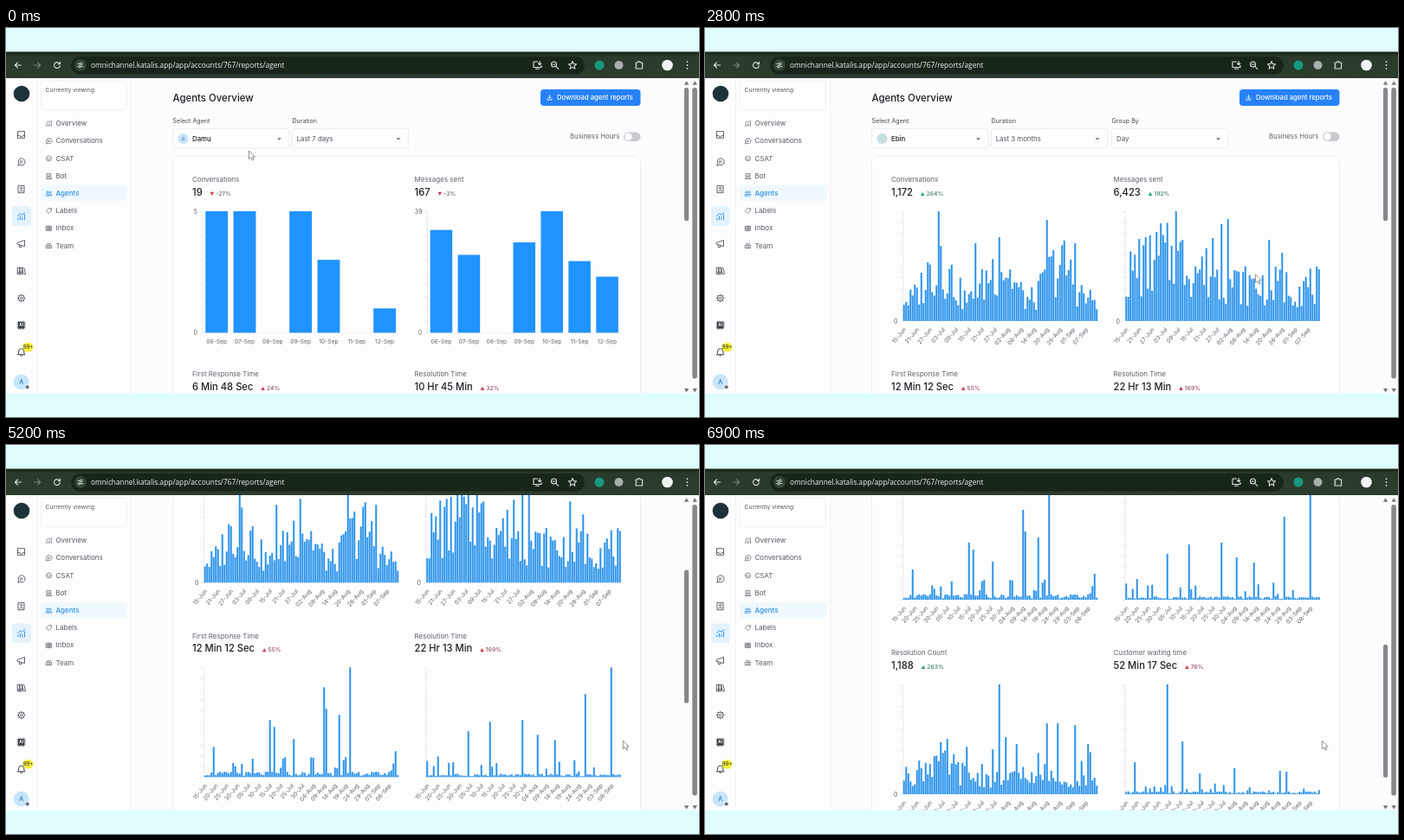
Animation, 800 px wide and 450 px high, one loop 7000 ms. Source, as an HTML page with a canvas:

```html
<!DOCTYPE html>
<html lang="en">
<head>
<meta charset="utf-8">
<title>Agents Overview</title>
<style>
html, body { margin: 0; width: 100%; height: 100%; overflow: hidden; background: #e0fdfd; }
canvas { display: block; width: 800px; height: 450px; }
</style>
</head>
<body>
<canvas id="stage" width="800" height="450"></canvas>
<script>
const ctx = document.getElementById('stage').getContext('2d');
const LOOP = 7000, STEP = 100;
const BLUE = '#1f93ff', THIN_BLUE = '#2b93ea', ACCENT = '#2b8fe0';
const INK = '#1c2024', GREY = '#60646c', LINE = '#ededf1';
const INTER = 'Inter, sans-serif';

// ---- drawing helpers ----
function text(s, x, y, size = 8, color = INK, weight = 400, align = 'left', family = INTER) {
  ctx.font = `${weight} ${size}px ${family}`;
  ctx.textAlign = align;
  ctx.fillStyle = color;
  ctx.fillText(s, x, y + size * 0.36);
  return ctx.measureText(s).width;
}
function rect(x, y, w, h, color) {
  ctx.fillStyle = color;
  ctx.fillRect(x, y, w, h);
}
function box(x, y, w, h, r, fill, stroke) {
  ctx.beginPath();
  ctx.roundRect(x, y, w, h, r);
  if (fill) { ctx.fillStyle = fill; ctx.fill(); }
  if (stroke) { ctx.strokeStyle = stroke; ctx.lineWidth = 1; ctx.stroke(); }
}
function disc(x, y, r, color) {
  ctx.beginPath();
  ctx.arc(x, y, r, 0, 7);
  ctx.fillStyle = color;
  ctx.fill();
}
function triangle(x, y, w, h, up, color) {
  const d = (up ? -h : h) / 2;
  ctx.beginPath();
  ctx.moveTo(x - w / 2, y - d);
  ctx.lineTo(x + w / 2, y - d);
  ctx.lineTo(x, y + d);
  ctx.fillStyle = color;
  ctx.fill();
}
function icon(name, x, y, color, scale = 1, width = 0.9) {
  ctx.save();
  ctx.translate(x, y);
  ctx.scale(scale, scale);
  ctx.strokeStyle = color;
  ctx.lineWidth = width / scale;
  ctx.lineCap = ctx.lineJoin = 'round';
  ctx.stroke(new Path2D(ICON[name]));
  ctx.restore();
}
function track(keys, t) {
  const n = keys.findIndex(k => t <= k[0]);
  if (n < 1) return keys.at(n).slice(1);
  const a = keys[n - 1], b = keys[n], k = (t - a[0]) / (b[0] - a[0]);
  return a.slice(1).map((v, j) => v + (b[j + 1] - v) * k);
}

// ---- icon paths ----
const ring = (x, y, r) => `M${x - r} ${y}a${r} ${r} 0 1 0 ${2 * r} 0a${r} ${r} 0 1 0 ${-2 * r} 0`;
function spokes(count, from, to) {
  let path = '';
  for (let i = 0; i < count; i++) {
    const a = i * 2 * Math.PI / count, c = Math.cos(a), s = Math.sin(a);
    path += `M${c * from} ${s * from}L${c * to} ${s * to}`;
  }
  return path;
}
const ICON = {
  inbox: 'M-4 -4h8v8h-8zM-4 1h2l1 1.5h2l1 -1.5h2',
  chat: 'M-4 4.2l.7 -2.4a4.2 4.2 0 1 1 1.7 1.7zM-1.6 -1h3.2M-1.6 1h2.2',
  book: 'M-3.5 -4.4h7v8.8h-7zM-2 2.4q2 -2 4 0' + ring(0, -1.3, 1.3),
  trend: 'M-4 4v-2M-1.3 4v-4M1.3 4v-3M4 4v-6M-4.3 -.5l3 -3l2.3 1.6l3.3 -2.6',
  horn: 'M-4.5 -1.2l8.5 -3v7.5l-8.5 -2.6zM-2.5 1.8v2.4h2.6v-1.6',
  shelf: 'M-4.3 -4h2.6v8h-2.6zM-1.7 -4h2.6v8h-2.6zM1.2 -3.2l2 -.5l2 7.2l-2 .5zM-4 1.8h4.6',
  gear: ring(0, 0, 3.7) + ring(0, 0, 1.4) + spokes(8, 3.7, 4.5),
  bell: 'M-4.3 2.8h8.6l-1.2 -1.8v-2a3.1 3.1 0 0 0 -6.2 0v2zM-1.2 3.2a1.2 1.2 0 0 0 2.4 0',
  smile: ring(0, 0, 4) + 'M-1.8 1.2q1.8 1.8 3.6 0M-1.5 -1v.2M1.5 -1v.2',
  bot: 'M-3 -3.5h6v4h-6zM-4 4v-1.5h8v1.5zM-1 -1.5v.2M1 -1.5v.2',
  people: ring(-1.8, -1.8, 1.6) + ring(2.2, -1.8, 1.4) + 'M-4.2 3.5v-2h4.6v2zM1.6 1.5h2.6v2h-2',
  tag: 'M.3 -4h3.7v3.7l-4.4 4.3l-3.6 -3.7zM2 -2v.1',
  tray: 'M-3.8 -3.5h7.6v7h-7.6zM-3.8 -1.2h7.6M-3.8 1.2h7.6M-1.2 -3.5v7M1.2 -3.5v7',
  team: 'M-4 -1h8v4.5h-8zM-2.8 -3h1.2M-.6 -3.4h1.2M1.6 -3h1.2M-1.4 -1v4.5M1.4 -1v4.5',
  back: 'M4 0h-8l3.5 -3.5M-4 0l3.5 3.5',
  forward: 'M-4 0h8l-3.5 -3.5M4 0l-3.5 3.5',
  reload: 'M3.4 -1.6a3.8 3.8 0 1 0 .3 2.4M3.8 -4v2.6h-2.6',
  tune: 'M-3.5 -1.8h3M-3.5 1.8h.8M.5 1.8h3' + ring(1, -1.8, 1.5) + ring(-1.1, 1.8, 1.5),
  install: 'M0 -4h-4.5v6.5h9v-2M-2 4.3h4M2.6 -4.5v4M1 -2l1.6 1.6l1.6 -1.6',
  zoom: ring(-1, -1, 3) + 'M1.3 1.3l3 3M-2.3 -1h2.6',
  star: 'M0 -4.5l1.3 3l3.2 .3l-2.4 2.1l.7 3.2l-2.8 -1.7l-2.8 1.7l.7 -3.2l-2.4 -2.1l3.2 -.3z',
  puzzle: 'M-4 -3h2.4a1.4 1.4 0 0 1 2.8 0h2.4v7h-7.6v-2.4a1.3 1.3 0 0 0 0 -2.5z',
  download: 'M0 -3.5v4.6M-1.8 -.6l1.8 1.8l1.8 -1.8M-3.2 1.6v1.8h6.4v-1.8'
};

// ---- chart data ----
const DAYS = 90, TALL = 127;
function rand(i, seed) {
  const v = Math.sin(i * 12.9898 + seed * 78.233) * 43758.5453;
  return v - Math.floor(v);
}
const hump = (i, mid, width) => Math.exp(-(((i - mid) / width) ** 2));

// Bar heights: noise around a trend, some bursts, and a few named peaks
function series(seed, trend, burst, peaks) {
  return Array.from({ length: DAYS }, (_, i) => {
    const noise = trend(i) * (0.4 + 1.2 * rand(i, seed));
    return peaks[i] ?? noise * (rand(i, seed + 20) > 0.82 ? burst : 1);
  });
}
const daily = [
  series(3, i => 44 + 20 * Math.cos((i - 16) * Math.PI / 14), 1,
    { 16: TALL, 17: 87, 33: 90, 44: 97, 66: 117, 79: 90 }),
  series(7, i => 40 + 32 * hump(i, 20, 20), 1,
    { 6: 95, 16: 113, 23: TALL, 40: 96, 44: 112, 47: 118, 66: 94, 72: 79 }),
  series(5, () => 4, 4, { 4: 35, 30: 66, 32: 58, 41: 44, 55: 104, 56: 79, 62: 72, 67: TALL, 88: 30 }),
  series(9, () => 2.5, 5, { 5: 24, 19: 53, 29: 64, 44: 66, 51: 49, 59: 43, 73: 96, 85: TALL }),
  series(8, i => 18 + 20 * hump(i, 16, 10), 1.8,
    { 20: 64, 44: TALL, 47: 66, 52: 58, 66: 82, 71: 82, 79: 80, 85: 58 }),
  series(11, () => 2, 4, { 4: 37, 19: TALL, 26: 61, 34: 24, 50: 30, 71: 27, 74: 26 })
];

function dayLabel(day) {
  const date = new Date(Date.UTC(2025, 5, 15 + day));
  const month = ['Jun', 'Jul', 'Aug', 'Sep'][date.getUTCMonth() - 5];
  return String(date.getUTCDate()).padStart(2, '0') + '-' + month;
}

const views = {
  first: {
    agent: 'Damu', initial: 'D', range: 'Last 7 days', left: 227,
    weekly: [[5, 5, 0, 5, 3, 0, 1], [33, 25, 0, 29, 39, 23, 18]],
    stats: ['19|-27%', '167|-3%', '6 Min 48 Sec|24%', '10 Hr 45 Min|32%']
  },
  second: {
    agent: 'Ebin', range: 'Last 7 days', left: 230,
    weekly: [[3, 8, 9, 1, 1, 12, 4], [32, 19, 53, 70, 26, 43, 29]],
    stats: ['38|-60%', '272|-29%', '8 Min 26 Sec|195%', '3 Day 20 Hr|915%']
  },
  quarter: {
    agent: 'Ebin', range: 'Last 3 months', grouped: true,
    stats: ['1,172|264%|good', '6,423|192%|good', '12 Min 12 Sec|55%', '22 Hr 13 Min|169%',
      '1,188|263%|good', '52 Min 17 Sec|76%']
  }
};
const titles = ['Conversations', 'Messages sent', 'First Response Time', 'Resolution Time',
  'Resolution Count', 'Customer waiting time'];
const ROW = 225;

// ---- charts ----
function axis(x, top, base) {
  rect(x - 0.5, top, 0.8, base - top, '#e4e4e8');
  for (let i = 0; i <= 10; i++) rect(x - 4, top + (base - top) * i / 10, 4, 0.7, '#e4e4e8');
}
function weekChart(x0, x1, values) {
  const top = 212, base = 352.5, max = Math.max(...values), step = (x1 - x0) / 7;
  axis(x0, top, base);
  rect(x0, base, x1 - x0, 0.7, '#e8e8ec');
  text(String(max), x0 - 6, top, 7, GREY, 400, 'right');
  text('0', x0 - 6, base, 7, GREY, 400, 'right');
  values.forEach((v, i) => {
    const mid = x0 + step * (i + 0.5), h = (base - top) * v / max;
    rect(mid - step * 0.4, base - h, step * 0.8, h, BLUE);
    text(dayLabel(83 + i), mid, 363, 6.7, GREY, 400, 'center');
  });
}
function dayChart(values, n) {
  const x0 = n % 2 ? 485 : 228.5, base = 339 + ROW * (n >> 1);
  const counts = n < 2 || n === 4, every = counts ? 6 : 5;
  axis(x0, base - TALL, base);
  if (counts) text('0', x0 - 6, base, 7, GREY, 400, 'right');
  values.forEach((h, i) => {
    const x = x0 + 1.25 + i * 2.5;
    rect(x - 1, base - h, 2, h, THIN_BLUE);
    if (i % every) return;
    ctx.save();
    ctx.translate(x + 1, base + 8.5);
    ctx.rotate(-0.87);
    text(dayLabel(i), 0, 0, 6.7, GREY, 400, 'right');
    ctx.restore();
  });
}
function stat(entry, n) {
  const [value, delta, good] = entry.split('|');
  const x = n % 2 ? 471.5 : 215, y = 175.5 + ROW * (n >> 1), up = delta[0] !== '-';
  text(titles[n], x, y, 8, GREY);
  const w = text(value, x, y + 14, 11.2, INK, 500);
  triangle(x + w + 11.2, y + 16.3, 4.6, 4.2, up, good ? '#30a46c' : '#c9404f');
  text(delta, x + w + 15.5, y + 16, 6.8, good ? '#3d8168' : up ? '#94505b' : '#74666c', 500);
}

// ---- scrolling page ----
function select(x, w, label, value, indent, color, open) {
  text(label, x + 0.5, 107.5, 7.1, '#45484e');
  box(x + 0.5, 116.5, w, 22.5, 3, '#fdfdfe', LINE);
  text(value, x + indent, 128, 7.8, color, color === INK ? 500 : 400);
  triangle(x + w - 11, open ? 126.5 : 128.5, 5, 2.6, open, '#777');
}
function page(view, open, hover) {
  text('Agents Overview', 192.5, 80.5, 11.4, INK, 500);
  box(617, 71, 115.5, 19, 4, '#2781f6');
  icon('download', 627.5, 80.5, '#fff', 0.8, 0.8);
  text('Download agent reports', 636, 80.5, 7.65, '#fff', 500);

  select(192, 134.5, 'Select Agent', view.agent, 23, INK);
  disc(204.5, 128, 6, view.initial ? '#c4e3fa' : '#c5dfdf');
  if (view.initial) text(view.initial, 204.5, 128, 4.5, '#2b7bbb', 500, 'center');
  select(330, 134, 'Duration', view.range, 5.7, '#50545b', open);
  if (view.grouped) select(469, 134.5, 'Group By', 'Day', 6, '#50545b');

  text('Business Hours', 651, 125.5, 7.8, GREY);
  box(713, 120.5, 19.5, 10.5, 5.25, '#c9cacf');
  disc(718.5, 125.7, 4.2, '#fff');

  box(192.5, 148.5, 540, 700, 6, '#fdfdfe', LINE);
  view.stats.forEach(stat);
  if (view.weekly) {
    weekChart(view.left, 453.3, view.weekly[0]);
    weekChart(486.5, 710, view.weekly[1]);
  } else {
    daily.forEach(dayChart);
  }
  if (open) menu(hover);
}
function menu(hover) {
  const items = ['Last 7 days', 'Last 30 days', 'Last 3 months', 'Last 6 months', 'Last year', 'Custom date range'];
  box(330, 139.5, 134.5, 149, 3, '#fefefe', '#e2e3e7');
  items.forEach((s, i) => {
    const y = 139.5 + i * 24.7;
    if (!i || i === hover) rect(330.5, y, 133.5, 24.7, '#e1f0fb');
    text(s, 337, y + 12.5, 7.8, '#26292e');
    if (i === hover) text('Press enter to select', 458, y + 11.5, 7, GREY, 400, 'right');
  });
}

// ---- fixed parts ----
function browser() {
  rect(0, 0, 800, 450, '#e0fdfd');
  const g = ctx.createLinearGradient(0, 27, 0, 58);
  g.addColorStop(0, '#141f14');
  g.addColorStop(0.18, '#2a3a2b');
  g.addColorStop(1, '#2c3c2d');
  rect(0, 27.5, 800, 30.5, g);
  box(75, 33, 593, 20.5, 10, '#18261a');
  disc(86, 43, 7, '#334335');
  const pale = '#dfe6df';
  icon('back', 14, 43, pale, 0.9, 1.1);
  icon('forward', 36, 43, '#78847a', 0.9, 1.1);
  icon('reload', 59, 43, pale, 0.9, 1.1);
  icon('tune', 86, 43, pale, 0.9);
  text('omnichannel.katalis.app/app/accounts/767/reports/agent', 98, 43, 8.3, '#eef2ee', 400, 'left', '"Open Sans", sans-serif');
  icon('install', 613.5, 43, pale, 1, 1.1);
  icon('zoom', 633.5, 43, pale, 1, 1.1);
  icon('star', 654, 43, pale, 1, 1.1);
  disc(685, 43, 5.5, '#159a7f');
  disc(707.5, 43, 5, '#a9afaa');
  icon('puzzle', 731, 43, pale, 1, 1.1);
  disc(763.5, 43, 6.3, '#f2f5f5');
  for (const dy of [-3.8, 0, 3.8]) disc(786.5, 43 + dy, 0.9, pale);
}
function chip(x, y) {
  for (let d = -3; d <= 3; d += 2) {
    rect(x + d - 0.4, y - 5, 0.8, 10, '#4a4e54');
    rect(x - 5, y + d - 0.4, 10, 0.8, '#4a4e54');
  }
  box(x - 3.6, y - 3.6, 7.2, 7.2, 1, '#3a3e44');
  text('AI', x, y, 4.6, '#fff', 700, 'center');
}
function sidebars() {
  rect(0, 58, 145, 364.5, '#fdfdfe');
  rect(35, 58, 0.8, 364.5, LINE);
  rect(144.3, 58, 0.8, 364.5, LINE);
  disc(18, 76, 9.3, '#1d3339');

  box(7, 206.5, 22, 22.5, 4, '#e3f2fd');
  ['inbox', 'chat', 'book', 'trend', 'horn', 'shelf', 'gear'].forEach((name, i) =>
    icon(name, 17.7, 123.5 + i * 31.5, name === 'trend' ? ACCENT : '#555a62', 0.95, 0.95));
  chip(17.6, 343.8);
  icon('bell', 17.7, 375, '#40444b', 1, 1);
  box(19.5, 364, 12, 10.5, 5.2, '#f6ee3c');
  text('99+', 25.5, 369.3, 6, '#3c3b16', 500, 'center');
  disc(17.7, 409.5, 9, '#c6e5fb');
  text('A', 17.7, 409.5, 7, '#2879b8', 500, 'center');
  disc(24.7, 415.3, 2.7, '#fff');
  disc(24.7, 415.3, 2.1, '#687078');

  box(40.5, 61.5, 98.5, 33, 3, '#fefefe', '#f2f2f5');
  text('Currently viewing:', 45.5, 72, 6.8, '#54585f');
  box(40, 182, 100, 18, 3, '#eff8fe');
  const items = { Overview: 'trend', Conversations: 'chat', CSAT: 'smile', Bot: 'bot',
    Agents: 'people', Labels: 'tag', Inbox: 'tray', Team: 'team' };
  Object.entries(items).forEach(([name, art], i) => {
    const y = 110.2 + i * 20.22, on = name === 'Agents';
    icon(art, 49.5, y + 0.3, on ? ACCENT : '#666a72', 0.75, 0.75);
    text(name, 57.5, y, 8, on ? ACCENT : '#565a62', on ? 500 : 400);
  });
}
function scrollbars(offset) {
  rect(790, 58, 10, 364.5, '#fafafa');
  box(783, 69 + offset * 0.42, 5.2, 154, 2.6, '#85878a');
  box(792.3, 69, 5.6, 336.5, 2.8, '#85878a');
  for (const x of [785.6, 795.2]) {
    triangle(x, 63.5, 5.5, 4.4, true, '#77797c');
    triangle(x, 419.3, 5.5, 4.4, false, '#77797c');
  }
}
function pointer(x, y, hand) {
  const path = new Path2D(hand
    ? 'M-1 0q1.2 -1 2 .3v4l4.2 .9q1.4 .4 1.2 2l-.7 4.8h-5.7l-3.2 -4.6q.6 -1.4 2.2 -.2z'
    : 'M0 0v9.6l2.3 -2l1.6 3.5l1.6 -.7l-1.5 -3.4h3z');
  ctx.save();
  ctx.translate(x, y);
  ctx.fillStyle = '#fff';
  ctx.strokeStyle = hand ? '#222' : '#73767a';
  ctx.lineWidth = 0.8;
  ctx.lineJoin = 'round';
  ctx.fill(path);
  ctx.stroke(path);
  ctx.restore();
}

// ---- timeline: [ms, ...values] ----
const scrollKeys = [[3700, 0], [4700, 117.5], [5700, 242], [6900, 385]];
const cursorKeys = [[0, 280.5, 142], [300, 263, 128], [900, 250, 160], [1300, 400, 128],
  [1600, 379, 169.5], [1800, 365, 198], [2000, 365, 198], [2800, 635.5, 285], [3500, 712.3, 342]];

function draw(t) {
  const [offset] = track(scrollKeys, t);
  const [cx, cy] = track(cursorKeys, t);
  const open = t >= 1300 && t < 2000;
  const view = t < 900 ? views.first : t < 2100 ? views.second : views.quarter;

  browser();
  ctx.save();
  ctx.beginPath();
  ctx.rect(0, 58, 800, 364.5);
  ctx.clip();
  rect(0, 58, 800, 364.5, '#fcfcfd');
  ctx.save();
  ctx.translate(0, -offset);
  page(view, open, Math.floor((cy - 139.5) / 24.7));
  ctx.restore();
  sidebars();
  scrollbars(offset);
  ctx.restore();
  pointer(cx, cy, open && cy > 139);
}
function tick() {
  const t = performance.now() % LOOP;
  draw(Math.floor(t / STEP) * STEP);
  requestAnimationFrame(tick);
}
tick();
</script>
</body>
</html>
```
